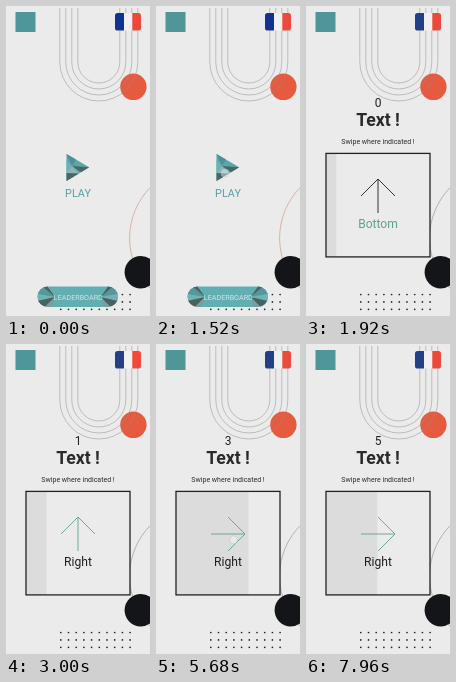
Recreate the animation shown at these times as an HTML page. Size 144 by 310 pixels, loop 8000 ms.

```html
<!DOCTYPE html>
<html lang="en">
<head>
<meta charset="utf-8">
<title>Swipe game</title>
<style>
  html, body { margin: 0; width: 100%; height: 100%; overflow: hidden; background: #ebebeb; }
  svg { display: block; width: 100%; height: 100%; }
  text { font-family: Roboto, sans-serif; text-anchor: middle; }
  .line { fill: none; stroke-linecap: butt; }
</style>
</head>
<body>
<svg viewBox="0 0 144 310">
  <defs>
    <clipPath id="flagClip"><rect x="109" y="7" width="26" height="17.5" rx="2.6"/></clipPath>
    <clipPath id="pill"><rect x="31.5" y="280.5" width="80.5" height="20.5" rx="10.2"/></clipPath>
  </defs>
  <rect width="144" height="310" fill="#ebebeb"/>
  <circle cx="127.4" cy="80.8" r="13.2" fill="#e65b40"/>
  <g id="rails" class="line" stroke="#8c8c8c" stroke-width=".5"></g>
  <circle id="arc" class="line" cx="195.6" cy="232" r="72" stroke-width=".6"/>
  <circle cx="134.8" cy="266.2" r="16.2" fill="#141518"/>
  <g id="dots" fill="#222"></g>
  <rect x="9.5" y="6" width="20" height="20" fill="#4f9699"/>
  <g clip-path="url(#flagClip)">
    <rect x="109" y="7" width="26" height="18" fill="#f0f0f0"/>
    <rect id="blue" x="109" y="7" width="9" height="18"/>
    <rect x="126.3" y="7" width="9" height="18" fill="#ec4a38"/>
  </g>

  <g id="menu">
    <path d="M60.5 148L83.2 161.3L60.5 175Z" fill="#5aa7aa"/>
    <path d="M60.5 148L70 153.6L66 160Z" fill="#4f9094"/>
    <path d="M60.5 154L66 160L60.5 167Z" fill="#6bb2b5"/>
    <path d="M66 160L83.2 161.3L75 166.2Z" fill="#4b6668"/>
    <path d="M60.5 167L66 160L73 167.4Z" fill="#8fb4b5"/>
    <path d="M60.5 167L73 167.4L60.5 175Z" fill="#4b6668"/>
    <text x="72" y="191.3" font-size="10.8" fill="#5a9ea5">PLAY</text>
    <g clip-path="url(#pill)">
      <rect x="31" y="280" width="82" height="22" fill="#62afb2"/>
      <g id="facetL">
        <path d="M31 280H41L49 291L31 288Z" fill="#57969a"/>
        <path d="M36 280H41L49 291Z" fill="#486264"/>
        <path d="M31 288L49 291L31 295Z" fill="#6fb3b5"/>
        <path d="M31 295L49 291L38 302H31Z" fill="#486264"/>
        <path d="M38 302L49 291L45 302Z" fill="#7c9c9d"/>
      </g>
      <use href="#facetL" transform="translate(143.5 0) scale(-1 1)"/>
    </g>
    <text x="72.3" y="293.6" font-size="7.2" fill="#d3e5e5">LEADERBOARD</text>
  </g>

  <g id="game">
    <text id="score" x="72" y="101" font-size="12" fill="#222"></text>
    <text x="72" y="120.3" font-size="17.6" font-weight="700" fill="#2a2a2a">Text !</text>
    <text x="72" y="137.6" font-size="7" fill="#2a2a2a">Swipe where indicated !</text>
    <rect x="20" y="147.5" width="104" height="103.5" fill="#ebebeb"/>
    <rect id="bar" x="20.5" y="148" height="102.5" fill="#dcdcdc"/>
    <rect class="line" x="20" y="147.4" width="104" height="103.5" stroke="#222" stroke-width="1.3"/>
    <path id="arrow" class="line" d="M55 190H89M72 173L89 190L72 207" stroke-width=".9"/>
    <text id="word" x="72" y="222.3" font-size="12.1"></text>
  </g>
  <circle id="touch" r="4" fill="#fff" fill-opacity=".4" stroke="#bbb" stroke-width=".5"/>
</svg>
<script>
const LOOP = 8000, FILL = 2000, GREEN = '#5ba386', DARK = '#1e1e1e';
const $ = id => document.getElementById(id);

const add = (parent, tag, attrs) => {
  const el = document.createElementNS('http://www.w3.org/2000/svg', tag);
  set(el, attrs);
  parent.append(el);
};
function set(el, attrs) {
  for (const k in attrs) el.setAttribute(k, attrs[k]);
}

for (let r = 21; r <= 39; r += 6)
  add($('rails'), 'path', { d: `M${92.8 - r} 2V56A${r} ${r} 0 0 0 ${92.8 + r} 56V2` });
for (let i = 0; i < 30; i++)
  add($('dots'), 'circle', { cx: 54.8 + (i % 10) * 7.7, cy: 288.5 + Math.floor(i / 10) * 7.4, r: .85 });

// angle: arrow direction; byWord: the word is the coloured cue
const rounds = [
  { at: 1730, angle: -90, word: 'Bottom', byWord: true },
  { at: 2615, angle: -90, word: 'Right' },
  { at: 3450, angle: 180, word: 'Right' },
  { at: 4290, angle: 0, word: 'Right' },
  { at: 5900, angle: 90, word: 'Right' },
  { at: 6980, angle: 0, word: 'Right' }
];

// each touch: start, end, release time, then path from and to
const touches = [
  [1440, 1640, 1700, 69, 167, 69, 167],
  [2400, 2600, 2700, 74, 180, 74, 225],
  [3240, 3440, 3540, 74, 222, 74, 178],
  [4060, 4300, 4540, 92, 200, 39, 207],
  [5570, 5830, 5960, 58, 197, 108, 194],
  [6760, 6960, 7060, 76, 178, 76, 224]
];

const clamp = v => Math.min(1, Math.max(0, v));
const ease = v => v * v * (3 - 2 * v);

function draw(t) {
  const n = rounds.filter(r => t >= r.at).length - 1;
  const playing = n >= 0;
  $('menu').style.display = playing ? 'none' : '';
  $('game').style.display = playing ? '' : 'none';
  set($('arc'), { stroke: playing ? '#8f8a88' : '#d08a7c' });
  set($('blue'), { fill: playing ? '#233f86' : '#123291' });

  if (playing) {
    const { at, angle, word, byWord } = rounds[n];
    $('score').textContent = n;
    $('word').textContent = word;
    set($('word'), { fill: byWord ? GREEN : DARK });
    set($('arrow'), { transform: `rotate(${angle} 72 190)`, stroke: byWord ? DARK : GREEN });
    set($('bar'), { width: 103.5 * clamp((t - at) / FILL) });
  }

  const hit = touches.find(p => t >= p[0] && t < p[2]);
  $('touch').style.display = hit ? '' : 'none';
  if (hit) {
    const [start, end, , x0, y0, x1, y1] = hit;
    const k = ease(clamp((t - start) / (end - start)));
    set($('touch'), { cx: x0 + (x1 - x0) * k, cy: y0 + (y1 - y0) * k });
  }
}

const begin = performance.now();
function frame() {
  draw((performance.now() - begin) % LOOP);
  requestAnimationFrame(frame);
}
frame();
</script>
</body>
</html>
```
